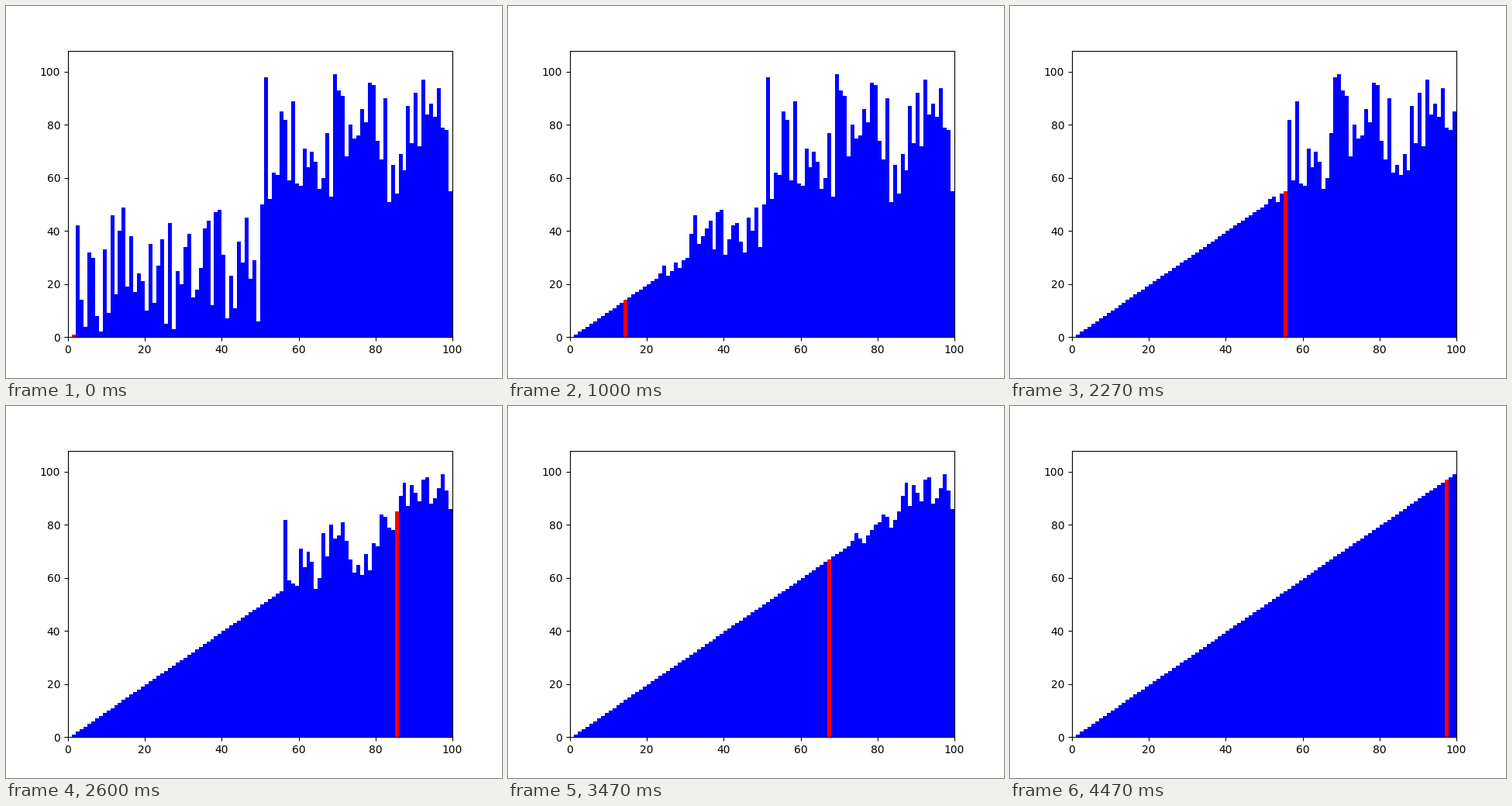
Write a matplotlib script that moves like this. It is 640 px wide and 480 px high and loops after 4540 ms.

```python
import matplotlib.pyplot as plt
from matplotlib.animation import FuncAnimation

LOOP_MS = 4540

# Already split around 1 and 50; the two unsorted runs remain.
START = [
    0, 1, 42, 14, 4, 32, 30, 8, 2, 33,
    9, 46, 16, 40, 49, 19, 38, 17, 24, 21,
    10, 35, 13, 27, 37, 5, 43, 3, 25, 20,
    34, 39, 15, 18, 26, 41, 44, 12, 47, 48,
    31, 7, 23, 11, 36, 28, 45, 22, 29, 6,
    50, 98, 52, 62, 61, 85, 82, 59, 89, 58,
    57, 71, 64, 70, 66, 56, 60, 77, 53, 99,
    93, 91, 68, 80, 75, 76, 86, 81, 96, 95,
    74, 67, 90, 51, 65, 54, 69, 63, 87, 73,
    92, 72, 97, 84, 88, 83, 94, 79, 78, 55,
]


def partition(a, low, high):
    """Lomuto partition around the last element."""
    i = low
    for j in range(low, high):
        if a[j] < a[high]:
            a[i], a[j] = a[j], a[i]
            i += 1
    a[i], a[high] = a[high], a[i]
    return i


def quicksort(a, low, high):
    """Yield a snapshot and the pivot's place after each partition."""
    if low < high:
        p = partition(a, low, high)
        yield a[:], p
        yield from quicksort(a, low, p - 1)
        yield from quicksort(a, p + 1, high)


data = START[:]
steps = [(START, 1)]
steps += quicksort(data, 2, 49)
steps += quicksort(data, 51, 99)

fig, ax = plt.subplots(figsize=(6.4, 4.8), dpi=100)
ax.set_xlim(0, 100)
ax.set_ylim(0, 108)
bars = ax.bar(range(len(START)), START, width=1, align="edge", color="blue")


def update(k):
    heights, pivot = steps[k]
    for i, (bar, h) in enumerate(zip(bars, heights)):
        bar.set_height(h)
        bar.set_color("red" if i == pivot else "blue")
        bar.set_linewidth(0)
    return bars


anim = FuncAnimation(fig, update, frames=len(steps),
                     interval=LOOP_MS / len(steps), repeat=True)
plt.show()
```
